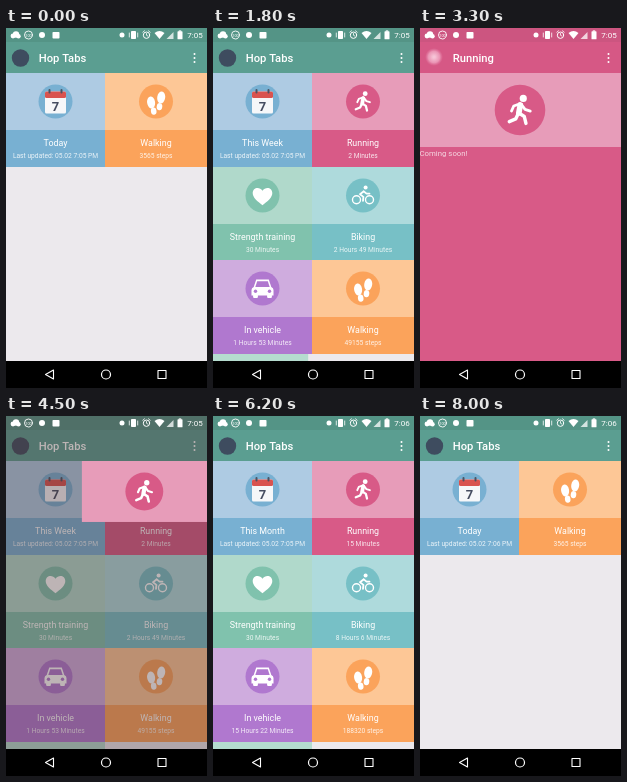
An HTML page with a canvas for the animation above (8100 ms loop, 201 by 360 pixels).

```html
<!DOCTYPE html>
<html lang="en">
<head>
<meta charset="utf-8">
<title>Hop Tabs</title>
<style>
html, body { margin: 0; width: 100%; height: 100%; overflow: hidden; background: #000; }
canvas { display: block; width: 201px; height: 360px; }
</style>
</head>
<body>
<canvas id="stage"></canvas>
<script>
const W = 201, H = 360, LOOP = 8100, NAV_Y = 333;
const COL = 99, ROW = 93.6, TOP = 45, LIGHT_H = 57;
const FONT = 'Roboto, sans-serif';
const canvas = document.getElementById('stage');
const ctx = canvas.getContext('2d');
const scale = window.devicePixelRatio || 1;
canvas.width = W * scale;
canvas.height = H * scale;

const clamp = v => Math.max(0, Math.min(1, v));
const span = (t, from, to) => clamp((t - from) / (to - from));
const ease = p => (1 - Math.cos(Math.PI * p)) / 2;
const mix = (a, b, p) => a + (b - a) * p;
const rowY = row => Math.round(TOP + row * ROW);

function rect(x, y, w, h, color) {
  ctx.fillStyle = color;
  ctx.fillRect(x, y, w, h);
}
function round(x, y, w, h, r, color) {
  ctx.fillStyle = color;
  ctx.beginPath();
  ctx.roundRect(x, y, w, h, r);
  ctx.fill();
}
function oval(x, y, rx, ry, color, turn = 0) {
  ctx.fillStyle = color;
  ctx.beginPath();
  ctx.ellipse(x, y, rx, ry, turn, 0, Math.PI * 2);
  ctx.fill();
}
const disc = (x, y, r, color) => oval(x, y, r, r, color);
function ring(x, y, r, width, color = '#fff') {
  ctx.strokeStyle = color;
  ctx.lineWidth = width;
  ctx.beginPath();
  ctx.arc(x, y, r, 0, Math.PI * 2);
  ctx.stroke();
}
function stroke(path, width, color = '#fff') {
  ctx.strokeStyle = color;
  ctx.lineWidth = width;
  ctx.lineCap = ctx.lineJoin = 'round';
  ctx.stroke(new Path2D(path));
}
function shape(path, color = '#fff') {
  ctx.fillStyle = color;
  ctx.fill(new Path2D(path));
}
function text(str, x, y, size, { weight = 400, align = 'left', color = '#fff' } = {}) {
  ctx.font = `${weight} ${size}px ${FONT}`;
  ctx.textAlign = align;
  ctx.fillStyle = color;
  ctx.fillText(str, x, y);
}
function layer(alpha, draw) {
  if (alpha <= 0) return;
  ctx.save();
  ctx.globalAlpha *= alpha;
  draw();
  ctx.restore();
}

// Icons are drawn around the centre of a 17 px disc.
const icons = {
  calendar() {
    round(-10.5, -10, 21, 22, 1.5, '#f6f7f9');
    round(-10.5, -10, 21, 6.5, 1.5, '#d9534f');
    for (const x of [-6, 6]) round(x - 1, -12.5, 2, 4.5, 1, '#4b5363');
    text('7', 0, 9.2, 13, { weight: 700, align: 'center', color: '#454c60' });
  },
  run() {
    disc(2.2, -7.8, 2.4, '#fff');
    stroke('M.2 -3.4L-.8 2', 3.8);
    stroke('M0 -4.2L-4.2 -2.7L-5.7 .7M.8 -3.8L3.4 -.4L6.9 .7', 1.9);
    stroke('M-.8 2L2.9 4.4L4 9M-1 2L-2.9 6L-7.2 7.8', 2.3);
  },
  heart() {
    shape('M0 9.8C-5 5.8 -9.8 2.2 -9.8 -2.5C-9.8 -8.3 -2.9 -9.3 0 -4.8C2.9 -9.3 9.8 -8.3 9.8 -2.5C9.8 2.2 5 5.8 0 9.8Z');
  },
  bike() {
    ring(-6.5, 4.2, 4, 1.4);
    ring(6.5, 4.2, 4, 1.4);
    disc(2.6, -8, 2, '#fff');
    stroke('M.8 -4.2L-3 -1.2L.4 1.4L0 5.4M.8 -4.2L3.5 -1.8L6.5 -1.8', 1.8);
  },
  car() {
    shape('M-6.3 -9H6.3L8.8 -1.6Q11 -.6 11 1.6V7H-11V1.6Q-11 -.6 -8.8 -1.6Z');
    shape('M-5.3 -7.2H5.3L7.2 -1.6H-7.2Z', '#b078cf');
    for (const x of [-7, 7]) {
      disc(x, 2.8, 1.7, '#b078cf');
      round(x - 2.4, 6, 4.8, 3.6, 1, '#fff');
    }
  },
  steps() {
    oval(-4.9, 1, 4, 6.1, '#fff', -.15);
    oval(-2.3, 9.6, 2.8, 3.6, '#fff', -.15);
    oval(5.2, -4, 4, 6.1, '#fff', .15);
    oval(3.5, 5.2, 2.8, 3.6, '#fff', .15);
  }
};
function badge(kind, x, y, r, color) {
  disc(x, y, r, color);
  ctx.save();
  ctx.translate(x, y);
  ctx.scale(r / 17, r / 17);
  icons[kind]();
  ctx.restore();
}

const PINK = { light: '#e79cb9', dark: '#d85a87' };
const tones = {
  calendar: ['#aecbe3', '#78b0d2'],
  run: [PINK.light, PINK.dark],
  heart: ['#b0d9cb', '#80c2ad'],
  bike: ['#aedadc', '#77c0c6'],
  car: ['#cfacde', '#b078cf'],
  steps: ['#fdc796', '#fba35b']
};
function card(kind, index, title, detail) {
  const [light, dark] = tones[kind];
  const row = index >> 1;
  const x = index % 2 ? COL : 0, y = rowY(row);
  const w = index % 2 ? W - COL : COL;
  const cx = x + w / 2;
  rect(x, y, w, LIGHT_H, light);
  rect(x, y + LIGHT_H, w, rowY(row + 1) - y - LIGHT_H, dark);
  badge(kind, cx, y + 28.5, 17, dark);
  text(title, cx, y + 73, 8.9, { align: 'center' });
  text(detail, cx, y + 85.4, 6.7, { align: 'center', color: 'rgba(255,255,255,.85)' });
}

const updated = time => `Last updated: 05.02 ${time} PM`;
const activities = (run, bike, car, steps) => [
  ['run', 'Running', run],
  ['heart', 'Strength training', '30 Minutes'],
  ['bike', 'Biking', bike],
  ['car', 'In vehicle', car],
  ['steps', 'Walking', steps]
];
const today = time => [
  ['calendar', 'Today', updated(time)],
  ['steps', 'Walking', '3565 steps']
];
const week = [['calendar', 'This Week', updated('7:05')],
  ...activities('2 Minutes', '2 Hours 49 Minutes', '1 Hours 53 Minutes', '49155 steps')];
const month = [['calendar', 'This Month', updated('7:05')],
  ...activities('15 Minutes', '8 Hours 6 Minutes', '15 Hours 22 Minutes', '188320 steps')];

const WEEK_AT = 1400, MONTH_AT = 5700, TODAY_AT = 7200;

function cardList(t) {
  rect(0, TOP, W, NAV_Y - TOP, '#ece9ed');
  const long = t >= WEEK_AT && t < TODAY_AT;
  const items = !long ? today(t < WEEK_AT ? '7:05' : '7:06') : t < MONTH_AT ? week : month;
  const slide = (start, draw) => {
    const p = long ? ease(span(t, start, start + 400)) : 1;
    layer(p, () => {
      ctx.translate(-100 * (1 - p), 0);
      draw();
    });
  };
  items.forEach(([kind, title, detail], i) => {
    const draw = () => card(kind, i, title, detail);
    if (i) slide(WEEK_AT, draw);
    else draw();
  });
  if (long) slide(WEEK_AT + 50, () => rect(0, rowY(3), COL, 10, '#b4dccf'));
}

function bars(title, status, toolbar) {
  rect(0, 0, W, 14, status);
  rect(0, 14, W, TOP - 14, toolbar);
  text(title, 32.8, 34, 11.2, { weight: 500 });
  for (const y of [26, 30, 34]) disc(188.5, y, 1, '#fff');
}

function statusIcons(t) {
  disc(7, 8, 2.4, '#fff');
  disc(10, 6.5, 3.2, '#fff');
  disc(12.5, 8.2, 2.2, '#fff');
  ring(22.5, 7, 4, .9);
  text('100', 22.5, 8.5, 4, { align: 'center' });
  disc(36, 7, 3, '#fff');
  round(46.5, 4, 7, 6.5, .8, '#fff');
  disc(116, 7, 2.5, '#fff');
  round(125, 3, 5, 8, .8, '#fff');
  stroke('M123.3 5V9M131.7 5V9', .8);
  ring(140.5, 7.2, 3.2, 1);
  stroke('M140.5 5.5V7.3L141.8 8M136.8 4.2L138.5 2.8M144.2 4.2L142.5 2.8', .8);
  shape('M148.5 5Q153.5 .8 158.5 5L153.5 11Z');
  shape('M160.5 11L167.5 4V11Z', 'rgba(255,255,255,.75)');
  round(171.5, 3.3, 5, 8, .6, '#fff');
  rect(172.8, 2.4, 2.4, 1.2, '#fff');
  text(t < 6000 ? '7:05' : '7:06', 196.8, 10.2, 8, { align: 'right' });
}

function navBar() {
  rect(0, NAV_Y, W, H - NAV_Y, '#000');
  stroke('M39.5 346.5L47.5 342V351Z', 1.1);
  ring(100, 346.5, 4.5, 1.2);
  stroke('M152 342.5H160V350.5H152Z', 1.1);
}

function detailPage() {
  bars('Running', '#cc5580', '#d65885');
  rect(0, TOP, W, NAV_Y - TOP, PINK.dark);
  text('Coming soon!', -.5, 127.5, 7.8, { color: 'rgba(255,255,255,.75)' });
  const glow = ctx.createRadialGradient(14, 29, 1, 14, 29, 9);
  glow.addColorStop(0, '#f6c3d6');
  glow.addColorStop(.6, '#ea94b4');
  glow.addColorStop(1, 'rgba(226,120,160,0)');
  disc(14, 29, 9, glow);
}

// p runs from the grid card (0) to the full-width header (1).
function sharedHeader(p) {
  const x = mix(COL, 0, p);
  rect(x, TOP, W - x, mix(LIGHT_H, 74, p), PINK.light);
  badge('run', mix(150, 100, p), TOP + mix(28.5, 37, p), mix(17, 25.3, p), PINK.dark);
}

const touches = [
  [1100, 1400, 41, 117, .4],
  [2600, 2950, 148, 114, .4],
  [5300, 5700, 39.5, 117, .3],
  [6700, 7200, 42, 116.5, .55]
];
function touchDots(t) {
  for (const [from, to, x, y, alpha] of touches) {
    if (t < from || t >= to) continue;
    const fade = Math.min(span(t, from - 100, from + 100), span(t, to + 100, to - 100));
    layer(alpha * fade, () => {
      disc(x, y, 6, '#e4eef5');
      disc(x, y, 3.6, '#f4f8fb');
    });
  }
}

function draw(t) {
  ctx.setTransform(scale, 0, 0, scale, 0, 0);
  bars('Hop Tabs', '#549486', '#5b9e91');
  disc(14.5, 30, 8.7, '#3e4c5f');
  cardList(t);

  if (t >= 2950 && t < 4800) {
    const opening = t < 3600;
    const grow = opening ? ease(span(t, 2950, 3250)) : 1 - ease(span(t, 4130, 4675));
    const page = opening ? span(t, 3000, 3300) : 1 - span(t, 3950, 4350);
    const dim = opening ? span(t, 2900, 3200) : 1 - span(t, 4450, 4800);
    layer(dim * .42, () => rect(0, 0, W, NAV_Y, '#4a3034'));
    layer(page, detailPage);
    sharedHeader(grow);
  }
  touchDots(t);
  statusIcons(t);
  navBar();
}

function tick() {
  const t = performance.now() % LOOP;
  draw(Math.floor(t / 100) * 100);
  requestAnimationFrame(tick);
}
tick();
</script>
</body>
</html>
```
